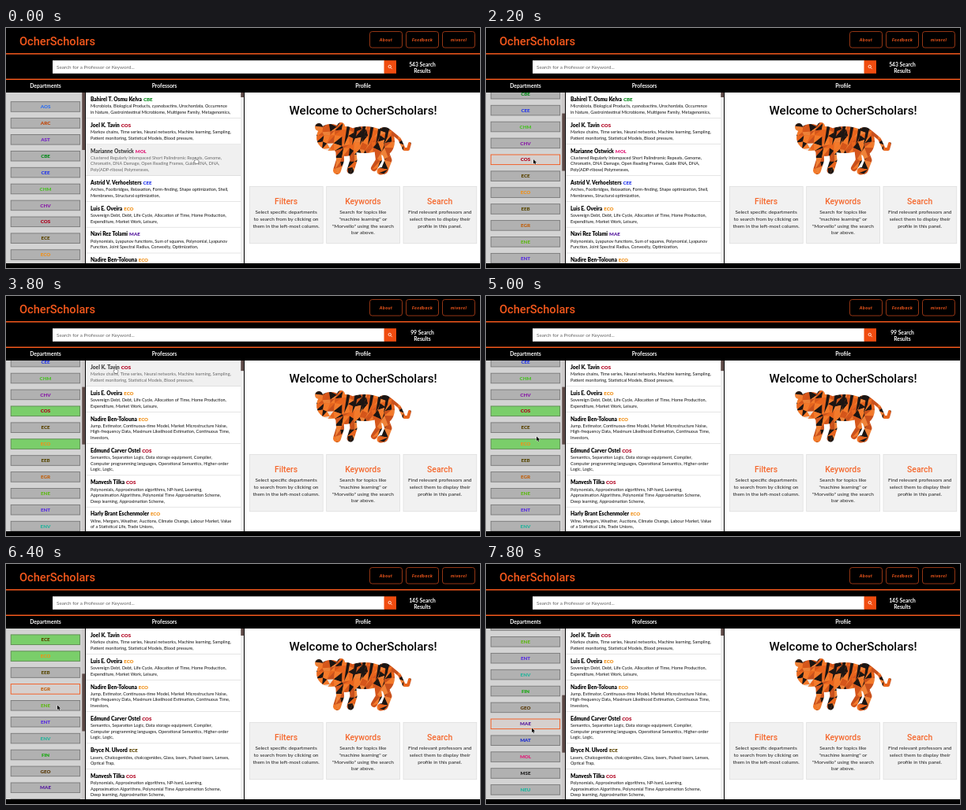
An HTML page with a canvas that plays this animation: 600 px wide and 305 px high, repeating every 8000 ms.

```html
<!DOCTYPE html>
<html lang="en">
<head>
<meta charset="utf-8">
<title>Professor search</title>
<style>
html, body { margin: 0; width: 100%; height: 100%; overflow: hidden; background: #000; }
canvas { display: block; width: 600px; height: 305px; }
</style>
</head>
<body>
<canvas id="stage"></canvas>
<script>
const canvas = document.getElementById("stage");
const ratio = window.devicePixelRatio || 1;
canvas.width = 600 * ratio;
canvas.height = 305 * ratio;
const ctx = canvas.getContext("2d");

const LOOP = 8000, STEP = 200;
const ORANGE = "#f4581c";
const TOP = 82, BOTTOM = 299;
const PITCH = 20.9;
const BRAND = "OcherScholars";
const BODY = "Lato, sans-serif";
const HEAD = "Roboto, sans-serif";

const deptColors = {
  AOS: "#2f6ff0", ARC: "#c0480c", AST: "#7420c8", CBE: "#0a8a1e", CEE: "#2a3ce8",
  CHM: "#4cc02a", CHV: "#8a1fa8", COS: "#b0001e", ECE: "#5a4300", ECO: "#f0911a",
  EEB: "#5a4a08", EGR: "#c0600e", ENE: "#62b81c", ENT: "#5a2fe0", ENV: "#28b49c",
  FIN: "#18a810", GEO: "#5a3a08", MAE: "#5a1fa0", MAT: "#1f2fd0", MOL: "#e0207a",
  MSE: "#222", NEU: "#20b8a0"
};
const depts = Object.keys(deptColors);

const people = {
  bahirel: ["Bahirel T. Osmu Kelva", "CBE",
    "Microbiota, Biological Products, cyanobactins, Urochordata, Occurrence",
    "in Nature, Gastrointestinal Microbiome, Multigene Family, Metagenomics,"],
  joel: ["Joel K. Tavin", "COS",
    "Markov chains, Time series, Neural networks, Machine learning, Sampling,",
    "Patient monitoring, Statistical Models, Blood pressure,"],
  marianne: ["Marianne Ostwick", "MOL",
    "Clustered Regularly Interspaced Short Palindromic Repeats, Genome,",
    "Chromatin, DNA Damage, Open Reading Frames, Guide RNA, DNA,",
    "Poly(ADP-ribose) Polymerases,"],
  astrid: ["Astrid V. Verhoelsters", "CEE",
    "Arches, Footbridges, Relaxation, Form-finding, Shape optimization, Shell,",
    "Membranes, Structural optimization,"],
  luis: ["Luis E. Oveira", "ECO",
    "Sovereign Debt, Debt, Life Cycle, Allocation of Time, Home Production,",
    "Expenditure, Market Work, Leisure,"],
  navi: ["Navi Rez Tolami", "MAE",
    "Polynomials, Lyapunov functions, Sum of squares, Polynomial, Lyapunov",
    "Function, Joint Spectral Radius, Convexity, Optimization,"],
  nadire: ["Nadire Ben-Tolouna", "ECO",
    "Jump, Estimator, Continuous-time Model, Market Microstructure Noise,",
    "High-frequency Data, Maximum Likelihood Estimation, Continuous Time,",
    "Investors,"],
  edmund: ["Edmund Carver Ostel", "COS",
    "Semantics, Separation Logic, Data storage equipment, Compiler,",
    "Computer programming languages, Operational Semantics, Higher-order",
    "Logic, Logic,"],
  manvesh: ["Manvesh Tilka", "COS",
    "Polynomials, Approximation algorithms, NP-hard, Learning,",
    "Approximation Algorithms, Polynomial Time Approximation Scheme,",
    "Deep learning, Approximation Scheme,"],
  harly: ["Harly Brant Eschenmoler", "ECO",
    "Wine, Mergers, Weather, Auctions, Climate Change, Labour Market, Value",
    "of a Statistical Life, Trade Unions,"],
  bryce: ["Bryce N. Ulvord", "ECE",
    "Lasers, Chalcogenides, chalcogenides, Glass, lasers, Pulsed lasers, Lenses,",
    "Optical Trap,"],
  corin: ["Corin D. Halvert", "COS",
    "Computational complexity, Algorithms, Data structures, Graph theory,",
    "Randomized algorithms,"],
  temsa: ["Temsa Orlindo", "COS",
    "Computer vision, Robotics, Neural networks, Image segmentation,",
    "Object recognition,"],
  wendra: ["Wendra P. Iskol", "COS",
    "Operating systems, Networks, Distributed systems, Security,",
    "Cloud computing,"]
};

// Each click selects one department and brings a new list
const results = [
  { from: 0, count: 543, ids: "bahirel joel marianne astrid luis navi nadire" },
  { from: 12, pick: "COS", count: 61, ids: "joel edmund manvesh corin temsa wendra" },
  { from: 15, pick: "ECO", count: 99, ids: "joel luis nadire edmund manvesh harly" },
  { from: 27, pick: "ECE", count: 145, ids: "joel luis nadire edmund bryce manvesh" }
];

// Moves and scrolls: first step, last step, destination
const start = [241, 168];
const moves = [
  [0, 3, 66, 138], [8, 11, 60, 167], [12, 14, 62, 187], [16, 19, 139, 94],
  [22, 25, 64, 178.5], [25, 26, 64, 168], [27, 30, 65, 179.5], [34, 38, 58, 208.5]
];
const scrolls = [[3, 7, 79], [12, 14, 100], [28, 32, 171], [34, 38, 252]];

const easeOut = u => 1 - (1 - u) ** 1.85;
const linear = u => u;

function follow(path, s, value, ease, i = 2) {
  for (const p of path) {
    if (s <= p[0]) break;
    const u = Math.min(1, (s - p[0]) / (p[1] - p[0]));
    value += (p[i] - value) * ease(u);
  }
  return value;
}

const scrollAt = s => follow(scrolls, s, 0, easeOut);
const pointerAt = s => [follow(moves, s, start[0], linear), follow(moves, s, start[1], linear, 3)];
const deptY = (i, scroll) => 100 + i * PITCH - scroll;
const rowHeight = id => 17.8 + 7.5 * (people[id].length - 2);

// Hover only updates while the pointer moves, so scrolling leaves it behind
function hoveredDept(s) {
  const last = moves.filter(m => m[0] <= s).pop();
  const then = Math.min(s, last[1]);
  const [x, y] = pointerAt(then);
  return x > 94 ? -1 : depts.findIndex((_, i) => Math.abs(deptY(i, scrollAt(then)) - y) <= 6.4);
}

function rect(x, y, w, h, fill, stroke, line = 0.7) {
  ctx.fillStyle = fill;
  ctx.fillRect(x, y, w, h);
  if (stroke) {
    ctx.strokeStyle = stroke;
    ctx.lineWidth = line;
    ctx.strokeRect(x, y, w, h);
  }
}

function text(str, x, y, font, color, align = "left") {
  ctx.font = font;
  ctx.fillStyle = color;
  ctx.textAlign = align;
  ctx.fillText(str, x, y);
}

function polygon(c, points) {
  c.beginPath();
  points.forEach(([x, y]) => c.lineTo(x, y));
  c.closePath();
}

function clipTo(x, y, w, h, draw) {
  ctx.save();
  ctx.beginPath();
  ctx.rect(x, y, w, h);
  ctx.clip();
  draw();
  ctx.restore();
}

function drawHeader(count) {
  rect(0, 0, 600, 305, "#000");
  text(BRAND, 17, 21.5, "500 14.6px " + HEAD, ORANGE);
  ctx.letterSpacing = "0.4px";
  ["About", "Feedback", "mivorel"].forEach((label, i) => {
    const x = 460 + i * 46;
    ctx.beginPath();
    ctx.roundRect(x + 0.5, 4.5, 41, 20.5, 3);
    ctx.strokeStyle = "#b8431a";
    ctx.lineWidth = 0.8;
    ctx.stroke();
    text(label, x + 21, 16.8, "italic 700 4.8px Inter, sans-serif", ORANGE, "center");
  });
  ctx.letterSpacing = "0px";
  rect(0, 32, 600, 1.5, ORANGE);
  rect(0, 64.5, 600, 1.5, ORANGE);

  rect(59, 41.2, 420, 16.6, "#fff");
  text("Search for a Professor or Keyword...", 64, 51.8, "6.3px " + BODY, "#666");
  rect(478.5, 41.2, 15.5, 16.6, "#f04c10");
  ctx.strokeStyle = "#fff";
  ctx.lineWidth = 0.8;
  ctx.beginPath();
  ctx.arc(485.7, 49, 1.7, 0, 7);
  ctx.moveTo(487, 50.4);
  ctx.lineTo(488.7, 52.1);
  ctx.stroke();

  const label = (str, x, y) => text(str, x, y, "bold 6.75px " + BODY, "#fff", "center");
  label(count + " Search", 527, 49.3);
  label("Results", 527, 57.3);
  label("Departments", 50, 76.3);
  label("Professors", 200.5, 76.3);
  label("Profile", 452, 76.3);
}

function drawDepartments(s) {
  const scroll = scrollAt(s);
  const hover = hoveredDept(s);
  rect(0, TOP, 100, BOTTOM - TOP, "#d3d3d3");
  depts.forEach((code, i) => {
    const y = deptY(i, scroll);
    const on = results.some(r => r.pick === code && s >= r.from);
    const hot = i === hover;
    rect(6.2, y - 6.3, 87.4, 12.6, on ? "#7ace6a" : hot ? "#d6d0ce" : "#b1b1b1",
      hot ? ORANGE : on ? "#5c8a50" : "#787878", 0.9);
    text(code, 50, y + 2.1, "900 6.2px " + BODY, deptColors[code], "center");
  });
  rect(96, TOP, 4, BOTTOM - TOP, "#cbc8c8");
  rect(96.3, TOP + scroll * 0.336, 3.6, 73, "#5b4744");
}

function drawProfessors(s, list) {
  const [px, py] = pointerAt(s);
  rect(101, TOP, 200, BOTTOM - TOP, "#fff");
  let y = TOP;
  list.ids.split(" ").forEach(id => {
    const [name, code, ...lines] = people[id];
    const h = rowHeight(id);
    const hot = px > 101 && py >= y && py < y + h;
    if (hot) rect(101, y, 196, h, "#f0f0f0");
    text(name, 107, y + 10.9, "900 6.6px " + BODY, hot ? "#444" : "#000");
    const end = 107 + ctx.measureText(name).width;
    text(code, end + 2, y + 10.9, "900 6.1px " + BODY, deptColors[code]);
    lines.forEach((line, k) =>
      text(line, 107, y + 19.3 + k * 7.5, "5.53px " + BODY, hot ? "#666" : "#111"));
    y += h;
    rect(101, y - 0.6, 196, 0.6, "#d4d4d4");
  });
  rect(297, TOP, 4, BOTTOM - TOP, "#ededed");
  rect(297.3, TOP, 3.6, Math.max(6, 1300 / list.count), "#5b4744");
}

function seeded(seed) {
  return () => (seed = (seed * 16807) % 2147483647) / 2147483647;
}

// Silhouette from ovals and limbs, then painted over with facets
function makeTiger() {
  const layer = document.createElement("canvas");
  layer.width = canvas.width;
  layer.height = canvas.height;
  const c = layer.getContext("2d");
  c.scale(ratio, ratio);
  c.fillStyle = c.strokeStyle = "#e8641c";
  c.lineCap = c.lineJoin = "round";
  const oval = (x, y, rx, ry) => {
    c.beginPath();
    c.ellipse(x, y, rx, ry, 0, 0, 7);
    c.fill();
  };
  const limb = (width, ...points) => {
    c.beginPath();
    points.forEach(([x, y]) => c.lineTo(x, y));
    c.lineWidth = width;
    c.stroke();
  };
  oval(411, 139, 18, 17);
  oval(396, 126, 5, 5);
  oval(424, 125, 5, 5);
  oval(430, 144, 18, 19);
  oval(454, 142, 30, 17);
  oval(479, 144, 13, 18);
  limb(10, [422, 150], [423, 168], [419, 181]);
  limb(9, [438, 150], [440, 168], [436, 181]);
  limb(9, [478, 152], [484, 168], [479, 181], [474, 182]);
  limb(8, [470, 152], [472, 168], [466, 178]);
  limb(4, [486, 131], [498, 141], [504, 154], [509, 154], [511, 147]);

  c.globalCompositeOperation = "source-atop";
  const rand = seeded(4127);
  const shades = ["#f47a2a", "#e8641c", "#d4551a", "#ee8238", "#c8501c"];
  const cell = 8, cols = 17, rows = 10;
  const grid = Array.from({ length: (cols + 1) * (rows + 1) }, (_, k) => [
    385 + (k % (cols + 1)) * cell + (rand() - 0.5) * 6,
    115 + Math.floor(k / (cols + 1)) * cell + (rand() - 0.5) * 6
  ]);
  const facet = (...points) => {
    const [x, y] = points[0];
    const face = x < 410 && y > 138 && y < 160;
    polygon(c, points);
    c.fillStyle = face && rand() < 0.25 ? "#eee3d6"
      : rand() < 0.2 ? "#1c1512" : shades[Math.floor(rand() * shades.length)];
    c.fill();
  };
  for (let r = 0; r < rows; r++) {
    for (let i = 0; i < cols; i++) {
      const k = r * (cols + 1) + i, d = k + cols + 1;
      facet(grid[k], grid[k + 1], grid[d]);
      facet(grid[k + 1], grid[d + 1], grid[d]);
    }
  }
  // Tapering stripes down the flank
  c.fillStyle = "#1c1512";
  for (let x = 432; x < 490; x += 10) {
    polygon(c, [[x, 122], [x + 4, 122], [x + 1, 138], [x - 4, 149]]);
    c.fill();
  }
  return layer;
}
const tiger = makeTiger();

const cards = [
  ["Filters", "Select specific departments", "to search from by clicking on", "them in the left-most column."],
  ["Keywords", "Search for topics like", "\"machine learning\" or", "\"Morvello\" using the search", "bar above."],
  ["Search", "Find relevant professors and", "select them to display their", "profile in this panel."]
];

function drawProfile() {
  rect(302, TOP, 298, BOTTOM - TOP, "#fff");
  text("Welcome to " + BRAND + "!", 452, 109.6, "500 15.1px " + HEAD, "#000", "center");
  ctx.drawImage(tiger, 0, 0, 600, 305);
  cards.forEach(([title, ...lines], i) => {
    const x = 308 + i * 97.3;
    rect(x + 0.4, 201.4, 92.8, 72.4, "#f1f1f1", "#dcdcdc");
    text(title, x + 46.6, 223.5, "500 10.4px " + HEAD, "#f5692f", "center");
    lines.forEach((line, k) =>
      text(line, x + 46.6, 236.4 + k * 8.65, "6.5px " + BODY, "#222", "center"));
  });
}

function drawPointer(s) {
  const [x, y] = pointerAt(s);
  ctx.save();
  ctx.translate(x, y);
  ctx.lineJoin = "round";
  const hand = x > 101;
  polygon(ctx, hand
    ? [[-1.6, -2.8], [-0.5, -2.8], [-0.3, -0.4], [2.8, 0.4], [2.4, 4], [-1, 4], [-3, 1], [-1.6, 1]]
    : [[0, 0], [0, 5.6], [1.3, 4.5], [2.2, 6.4], [3.1, 6], [2.3, 4.2], [4, 4]]);
  ctx.strokeStyle = hand ? "#222" : "#fff";
  ctx.fillStyle = hand ? "#fff" : "#000";
  ctx.lineWidth = 0.8;
  ctx.stroke();
  ctx.fill();
  ctx.restore();
}

function draw(s) {
  const list = results.filter(r => s >= r.from).pop();
  ctx.setTransform(ratio, 0, 0, ratio, 0, 0);
  drawHeader(list.count);
  clipTo(0, TOP, 100, BOTTOM - TOP, () => drawDepartments(s));
  clipTo(101, TOP, 200, BOTTOM - TOP, () => drawProfessors(s, list));
  drawProfile();
  drawPointer(s);
}

let shown = -1;
function tick() {
  const s = Math.floor((performance.now() % LOOP) / STEP);
  if (s !== shown) draw(shown = s);
  requestAnimationFrame(tick);
}
tick();
</script>
</body>
</html>
```
